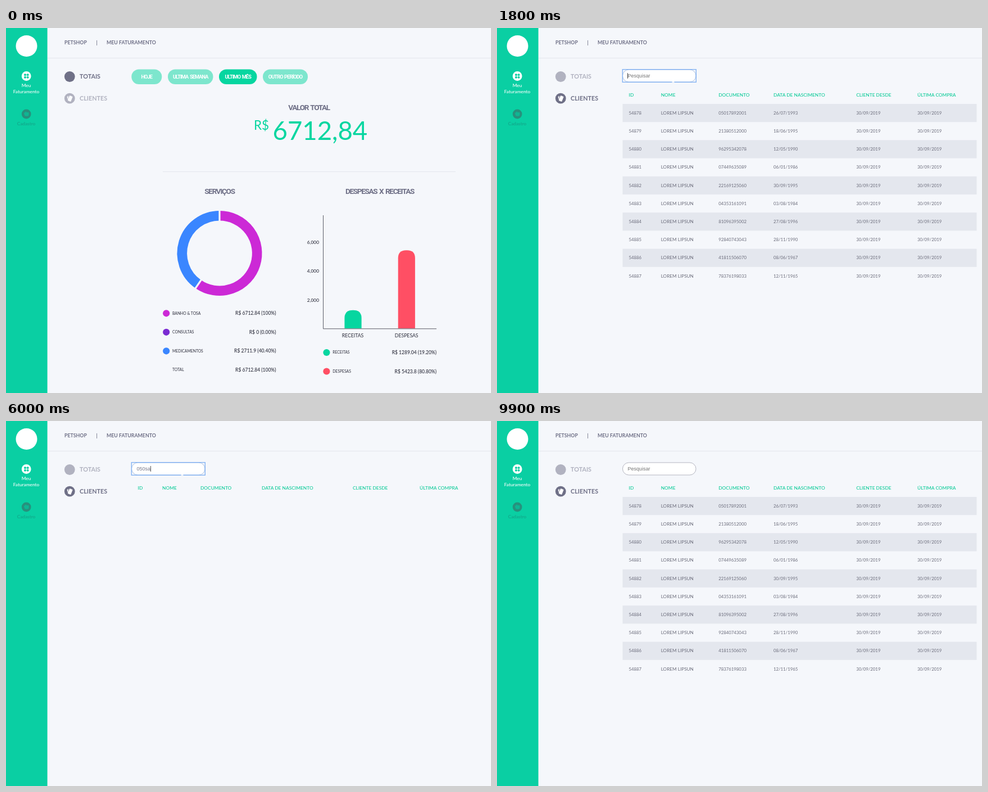
Write an HTML page that moves like this. It is 863 px wide and 649 px high and loops after 10000 ms.

```html
<!DOCTYPE html>
<html lang="pt">
<head>
<meta charset="utf-8">
<title>Meu faturamento</title>
<style>
  html, body { margin: 0; width: 100%; height: 100%; overflow: hidden; background: #f5f7fb; }
  svg { display: block; width: 863px; height: 649px; font-family: Lato, "Open Sans", sans-serif; }
  .tight { font-family: Roboto, Lato, sans-serif; font-weight: 700; letter-spacing: -.095em; word-spacing: .12em; }
  .field { font-family: "Liberation Sans", Arial, sans-serif; }
</style>
</head>
<body>
<svg id="stage" viewBox="0 0 863 649">
  <rect width="863" height="649" fill="#f5f7fb"/>
  <rect width="73.6" height="649" fill="#0acfa3"/>
  <path d="M74 53.5H863" stroke="#e3e6ed"/>
  <circle cx="36.5" cy="32" r="19" fill="#fff"/>
  <circle cx="36.2" cy="85.5" r="8.4" fill="#fff"/>
  <g fill="#0acfa3">
    <circle cx="34" cy="83.2" r="2"/><circle cx="38.6" cy="83.2" r="2"/>
    <circle cx="34" cy="87.8" r="2"/><circle cx="38.6" cy="87.8" r="2"/>
  </g>
  <circle cx="36.2" cy="153" r="8.4" fill="#27917d"/>
  <path d="M32 151l2-1 1.5-1.8 1 1.8h4v5.5q-4 2.5-7.5 0z" fill="#0fb693"/>
  <g id="frame"></g>
  <g id="totals" fill="#6f7087"><circle cx="113.3" cy="86.5" r="9.4"/></g>
  <g id="clients" fill="#6f7087">
    <circle cx="113.3" cy="125.2" r="9.4"/>
    <path d="M108.6 122.2l2.4-1.4-.6 8.2z" fill="#fff"/>
    <rect x="-3" y="-4.8" width="6" height="9.6" rx="1" fill="#fff" transform="translate(114.2 125.5) rotate(22)"/>
  </g>
  <g id="dashboard"></g>
  <g id="list">
    <rect id="input" x="223.5" y="74" width="130.5" height="22" rx="11" fill="#fff"/>
    <rect id="focus" x="223.3" y="73.7" width="131" height="22.6" fill="none" stroke="#7fb0f2" stroke-width="1.3"/>
    <g id="query"></g>
    <rect id="caret" y="80" width="1" height="10" fill="#555"/>
    <path id="beam" d="M311.5 96h4M313.5 86v10" fill="none" stroke="#fff" stroke-width="1.6"/>
    <g id="table"></g>
  </g>
  <path id="arrow" d="M0 0V13l3-2.8 2 4.8 2.2-.9-2-4.7H9z" fill="#fff" stroke="#222" stroke-width=".9"/>
  <path id="hand" d="M3.6 9.5V2q0-1.5 1.3-1.5T6.2 2v4.5q2-.8 2.4.6 1.6-.5 1.8.8 1.6-.2 1.6 1.2v3.4L10.6 16H4.8L.8 10.6q-.5-1.6 1-1.6z" fill="#fff" stroke="#222"/>
</svg>
<script>
const $ = id => document.getElementById(id);
const GREY = '#6f7087', INK = '#2d2e3c', GREEN = '#06d6a0', RED = '#ff4f64';

const text = (x, y, size, fill, str, anchor = 'start', extra = '') =>
  `<text x="${x}" y="${y}" font-size="${size}" fill="${fill}" text-anchor="${anchor}" ${extra}>${str}</text>`;
const bold = 'font-weight="700"', medium = 'font-weight="500"';
const tight = (x, y, size, fill, str) => text(x, y, size, fill, str, 'middle', 'class="tight"');

$('frame').innerHTML =
  text(104, 29, 8.8, GREY, 'PETSHOP', 'start', bold) +
  text(160.5, 29, 8.8, GREY, '|', 'start', bold) +
  text(179, 29, 8.8, GREY, 'MEU FATURAMENTO', 'start', bold) +
  text(36, 104.7, 8.3, '#fff', 'Meu', 'middle', medium) +
  text(36, 115.7, 8.3, '#fff', 'Faturamento', 'middle', medium) +
  text(36, 172.7, 8.3, '#13a387', 'Cadastro', 'middle', medium);
$('totals').innerHTML += text(131, 90.2, 10.8, GREY, 'TOTAIS', 'start', bold);
$('clients').innerHTML += text(131, 129, 10.8, GREY, 'CLIENTES', 'start', bold);

// Dashboard
const button = (x, w, label, alpha) =>
  `<rect x="${x}" y="73.5" width="${w}" height="26.5" rx="13.2" fill="${GREEN}" opacity="${alpha}"/>` +
  tight(x + w / 2, 90.3, 9.2, '#fff', label);

const legend = (x, y, right, color, label, value) =>
  (color ? `<circle cx="${x}" cy="${y}" r="6.1" fill="${color}"/>` : '') +
  text(x + 10.8, y + 2.4, 6.8, INK, label) + text(right, y + 3, 8.5, INK, value, 'end', medium);

const polar = (turn, r) =>
  [380 + r * Math.sin(turn * 2 * Math.PI), 400.5 - r * Math.cos(turn * 2 * Math.PI)];
const arc = (from, to, color) =>
  `<path d="M${polar(from, 66.7)}A66.7 66.7 0 ${+(to - from > .5)} 1 ${polar(to, 66.7)}" fill="none" stroke="${color}" stroke-width="17.6"/>`;
const gap = turn =>
  `<path d="M${polar(turn, 56)}L${polar(turn, 78)}" stroke="#f5f7fb" stroke-width="3.2"/>`;
const bar = (x, top, color) =>
  `<path d="M${x} 534V${top + 14}q0-14 14-14h2.2q14 0 14 14V534z" fill="${color}"/>`;

$('dashboard').innerHTML =
  button(223.3, 54, 'HOJE', .5) + button(288, 80.5, 'ULTIMA SEMANA', .5) +
  button(379, 67.5, 'ULTIMO MÊS', 1) + button(457, 80, 'OUTRO PERÍODO', .5) +
  tight(539, 145.7, 13.5, GREY, 'VALOR TOTAL') +
  text(441, 181, 22.5, GREEN, 'R$') + text(474.5, 199, 45.5, GREEN, '6712,84') +
  '<path d="M279 255.5H800" stroke="#e3e6ed"/>' +
  tight(380, 295, 13.5, GREY, 'SERVIÇOS') + tight(665, 295, 13.5, GREY, 'DESPESAS X RECEITAS') +
  arc(0, .596, '#cc29d6') + arc(.596, 1, '#3a86ff') + gap(0) + gap(.596) +
  legend(285.2, 507.3, 480.5, '#cc29d6', 'BANHO &amp; TOSA', 'R$ 6712.84 (100%)') +
  legend(285.2, 540.8, 480.5, '#7a2bd2', 'CONSULTAS', 'R$ 0 (0.00%)') +
  legend(285.2, 574.3, 480.5, '#3a86ff', 'MEDICAMENTOS', 'R$ 2711.9 (40.40%)') +
  legend(285.2, 607.8, 480.5, '', 'TOTAL', 'R$ 6712.84 (100%)') +
  bar(602.4, 501.8, GREEN) + bar(697.7, 395.3, RED) +
  '<path d="M564.5 333V534.8H766" fill="none" stroke="#5b5c66"/>' +
  [6, 4, 2].map((n, i) => text(557, 384 + i * 51.4, 8.3, INK, n + ',000', 'end', medium)).join('') +
  text(617, 550, 8.7, INK, 'RECEITAS', 'middle') + text(712.7, 550, 8.7, INK, 'DESPESAS', 'middle') +
  legend(570.4, 577, 766, GREEN, 'RECEITAS', 'R$ 1289.04 (19.20%)') +
  legend(570.4, 610.5, 766, RED, 'DESPESAS', 'R$ 5423.8 (80.80%)');

// Client list
const heads = ['ID', 'NOME', 'DOCUMENTO', 'DATA DE NASCIMENTO', 'CLIENTE DESDE', 'ÚLTIMA COMPRA'];
const columns = [234.5, 291.7, 394.2, 492, 639.2, 748];
const emptyColumns = [234.5, 278, 346, 455, 617, 736];
const rows = [
  '05017892001 26/07/1993', '21380512000 18/06/1995', '96295342078 12/05/1990',
  '07449635089 06/01/1986', '22169125060 30/09/1995', '04353161091 03/08/1984',
  '81096395002 27/08/1996', '92840743043 28/11/1990', '41811506070 08/06/1967',
  '78376198033 12/11/1965'
].map((s, i) => [String(54878 + i), 'LOREM LIPSUN', ...s.split(' '), '30/09/2019', '30/09/2019']);

function drawTable(query) {
  const found = rows.filter(r => r.some(cell => cell.includes(query)));
  const xs = found.length ? columns : emptyColumns;
  $('table').innerHTML =
    heads.map((h, c) => text(xs[c], 121.7, 8.4, '#0bcb98', h, 'start', medium)).join('') +
    found.map((r, i) => {
      const y = 135 + i * 32.2;
      return (i % 2 ? '' : `<rect x="223.5" y="${y}" width="630" height="32.2" fill="#e4e7ee"/>`) +
        r.map((cell, c) => text(xs[c], y + 18.8, c === 1 ? 8.2 : 7.8, '#6b6c7b', cell)).join('');
    }).join('');
}

// Input history: time, typed text, caret shown
const typing = [
  [0, '', 0], [1800, '', 1], [2300, '', 0], [2800, '', 1], [3300, '', 0],
  [3700, '0', 1], [4000, '05', 1], [4500, '05', 0], [4900, '050', 1], [5500, '050', 0],
  [5900, '050s', 1], [6000, '050sa', 1], [6500, '050sas', 1], [6600, '050sa', 0],
  [6800, '050s', 0], [7000, '050', 1], [7500, '05', 1], [7700, '0', 1], [7900, '', 1],
  [8500, '', 0], [9000, '', 1], [9600, '', 0]
];

const clamp = v => Math.max(0, Math.min(1, v));
const ease = p => p * p * (3 - 2 * p);
const curve = (a, b, c, p) => a * (1 - p) ** 2 + 2 * b * p * (1 - p) + c * p * p;
const show = (id, on) => $(id).setAttribute('visibility', on ? 'inherit' : 'hidden');

function pointer(t) {
  if (t >= 200 && t < 1200) {
    const p = ease(clamp((t - 200) / 500));
    return [t < 600 ? 'arrow' : 'hand', curve(32, 40, 130, p), curve(21, 200, 117.5, p)];
  }
  if (t >= 1200 && t < 1600) {
    const p = ease((t - 1100) / 500);
    return ['arrow', 134 + 179 * p, 118 - 36 * p];
  }
  if (t >= 8800 && t < 9300) {
    const p = ease((t - 8700) / 500);
    return ['arrow', 313 - 228 * p, 82 - 82 * p];
  }
  return [];
}

let lastQuery;
function draw(t) {
  const onList = t >= 1100, focused = t >= 1800 && t < 9900;
  $('dashboard').style.display = onList ? 'none' : '';
  $('list').style.display = onList ? '' : 'none';
  const fade = onList ? clamp((t - 970) / 300) : 0;
  $('totals').setAttribute('opacity', 1 - fade / 2);
  $('clients').setAttribute('opacity', .5 + fade / 2);

  const [, query, caret] = typing.findLast(e => e[0] <= t);
  if (query !== lastQuery) {
    drawTable(query);
    $('query').innerHTML = text(232.5, 88, 9, query ? '#77788a' : '#757575', query || 'Pesquisar', 'start', 'class="field"');
    $('caret').setAttribute('x', 232 + 5 * query.length);
    lastQuery = query;
  }
  show('caret', caret && focused);
  show('focus', focused);
  $('input').setAttribute('stroke', focused ? '#a9c0e2' : '#b4b5c0');
  show('beam', t >= 1600 && t < 8800);

  const [kind, x, y] = pointer(t);
  for (const id of ['arrow', 'hand']) {
    show(id, id === kind);
    if (id === kind) $(id).setAttribute('transform', `translate(${x} ${y})`);
  }
}

const start = performance.now();
function tick() {
  const t = (performance.now() - start) % 10000;
  draw(Math.floor(t / 100) * 100);
  requestAnimationFrame(tick);
}
tick();
</script>
</body>
</html>
```
